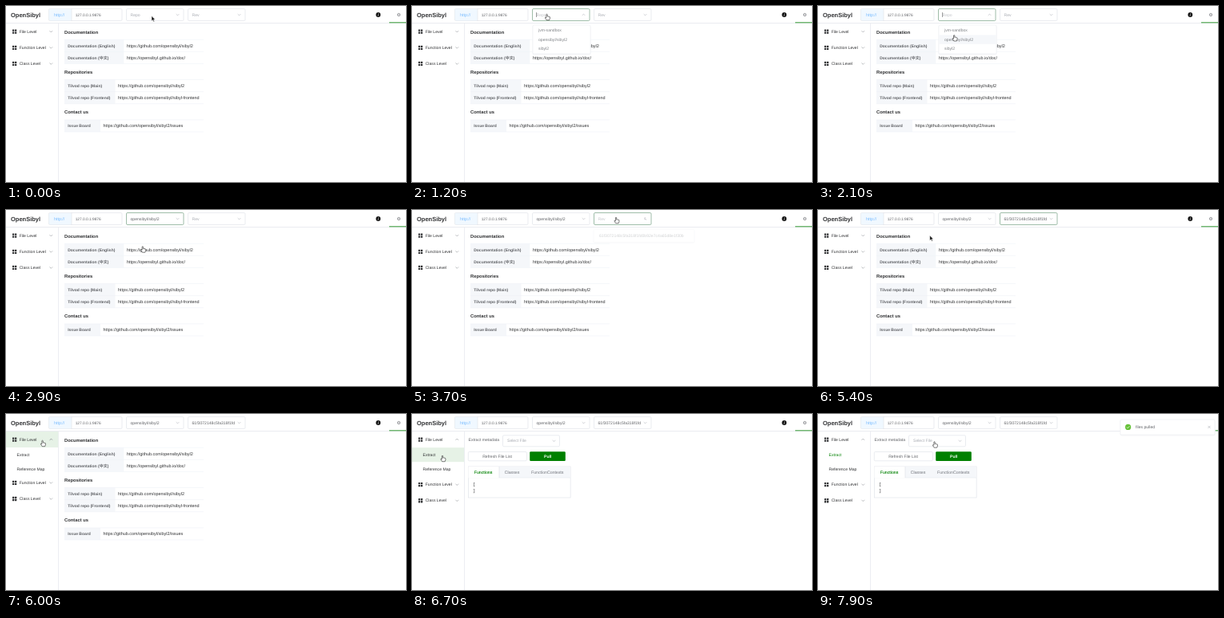
An HTML page for the animation above (8000 ms loop, 500 by 221 pixels).

```html
<!DOCTYPE html>
<html lang="en">
<head>
<meta charset="utf-8">
<title>OpenSibyl</title>
<style>
  html, body { margin: 0; height: 100%; overflow: hidden; background: #fff; }
  svg { display: block; width: 100vw; height: 100vh; }
  text { font-family: "Liberation Sans", Arial, "Noto Sans CJK SC", "Noto Sans CJK", sans-serif;
         text-rendering: geometricPrecision; white-space: pre; }
</style>
</head>
<body>
<svg id="stage" viewBox="0 0 500 221"></svg>
<script>
const LOOP = 8000, TICK = 100;
const GREEN = '#008000', FOCUS = '#5f9070', INK = '#303133', GRAY = '#606266', HINT = '#a8abb2',
      LINE = '#dcdfe6', PALE = '#f5f7fa', HOVER = '#e6f2e6';

// Cursor stops: time, x, y
const route = [
  [0, 183, 15.5], [400, 158, 14], [800, 169.5, 14], [1500, 169.5, 14], [2400, 171.7, 49.5],
  [2900, 171.7, 49.5], [3300, 228, 13], [3700, 256, 13], [4200, 256.5, 34], [4400, 256.5, 34],
  [5000, 235, 33], [5100, 235, 33], [5700, 46.5, 37], [6000, 46.5, 37], [6500, 39, 56],
  [7200, 39, 56], [7900, 146.5, 38.5], [8000, 146.5, 38.5]];

const ramp = (t, a, b) => Math.min(1, Math.max(0, (t - a) / (b - a)));
const easeOut = k => 1 - (1 - k) ** 2;

function cursorAt(t) {
  const i = route.findIndex(stop => stop[0] > t);
  const [t0, x0, y0] = route[i - 1], [t1, x1, y1] = route[i];
  const k = ramp(t, t0, t1), s = k * k * (3 - 2 * k);
  return [x0 + (x1 - x0) * s, y0 + (y1 - y0) * s];
}

// y is the middle of the line of text
const text = (x, y, str, { size = 5.1, fill = INK, more = '' } = {}) =>
  `<text x="${x}" y="${y + size * 0.35}" font-size="${size}" fill="${fill}" ${more}>${str}</text>`;
const bold = (x, y, str, size = 5, fill = INK) =>
  text(x, y, str, { size, fill, more: 'font-weight="700"' });
const rect = (x, y, w, h, fill, stroke = 'none', r = 0) =>
  `<rect x="${x}" y="${y}" width="${w}" height="${h}" rx="${r}" fill="${fill}" stroke="${stroke}" stroke-width=".6"/>`;
const line = (d, stroke, width = 0.6) =>
  `<path d="${d}" fill="none" stroke="${stroke}" stroke-width="${width}"/>`;
const group = (attrs, body) => `<g ${attrs}>${body}</g>`;
const chevron = (x, y, turn = 0, color = HINT) =>
  group(`transform="translate(${x} ${y}) rotate(${turn * 180})"`, line('M-1.8-.9L0 .9 1.8-.9', color, 0.55));

function select(x, y, label, { chosen, focus, open = 0 } = {}) {
  const fill = chosen ? GRAY : open ? '#c4c6ca' : HINT;
  return rect(x, y, 71.5, 15, '#fff', focus ? FOCUS : LINE, 1.4) +
    text(x + 5, y + 7.5, label, { fill }) + chevron(x + 64, y + 7.5, open);
}

function popup(x, y, w, h, opacity, body) {
  if (!opacity) return '';
  return group(`opacity="${opacity}"`,
    rect(x - 0.6, y + 0.4, w + 1.2, h + 1, '#f5f6f8', 'none', 1.8) +
    rect(x, y, w, h, '#fff', '#eceef2', 1.4) + body);
}

function header(t, repoOpen, revOpen) {
  const repoPicked = t >= 2500, revPicked = t >= 4400;
  const caret = t >= 1100 && t < 2500 && Math.floor((t - 1100) / 500) % 2 === 0;
  const teeth = Array.from({ length: 6 }, (_, i) =>
    group(`transform="rotate(${i * 60} 491 11)"`, line('M491 8.8V9.6', GRAY, 0.7))).join('');
  return bold(6, 11, 'OpenSibyl', 7.5) +
    rect(53.5, 3.5, 91.5, 15, '#fff', LINE, 1.4) +
    rect(53.8, 3.8, 28, 14.4, '#f0f8ff', 'none', 1.2) + line('M82 3.5V18.5', LINE) +
    text(60, 11, 'http://', { fill: '#74b9ff', size: 5.3 }) +
    text(86.7, 11, '127.0.0.1:9876', { fill: GRAY, size: 4.8 }) +
    select(150.5, 3.5, repoPicked ? 'opensibyl/sibyl2' : 'Repo',
      { chosen: repoPicked, focus: t >= 1100 && t < 3600, open: repoOpen }) +
    (caret ? line('M155.6 8V14', INK, 0.5) : '') +
    select(227.5, 3.5, revPicked ? '61f3072148c5fa318f1fd' : 'Rev',
      { chosen: revPicked, focus: t >= 3700 && t < 5800, open: revOpen }) +
    '<circle cx="465.3" cy="11" r="2.9" fill="#111"/>' + line('M465.5 10.4L465 12.8M465.6 9V9.7', '#fff', 0.6) +
    `<circle cx="491" cy="11" r="1.4" fill="none" stroke="${GRAY}" stroke-width=".5"/>` + teeth +
    line('M0 21.5H500', LINE) + line('M479 20.8H500', GREEN, 0.8);
}

function sidebar(t) {
  const unfold = easeOut(ramp(t, 5700, 6100)), shift = 36.3 * unfold;
  const entry = (y, label, turn = 0) =>
    [0, 3].map(dx => [0, 3].map(dy => rect(8 + dx, y - 2.6 + dy, 2.3, 2.3, INK, 'none', 0.3)).join('')).join('') +
    text(16.7, y, label) + chevron(56.3, y, turn, '#85888d');
  let out = line('M65.6 22V221', LINE);
  if (t >= 5600 && t < 6400) out += rect(0, 22, 65.3, 20, HOVER);
  out += entry(32, 'File Level', unfold) + entry(52.3 + shift, 'Function Level') + entry(72.4 + shift, 'Class Level');
  const hover = t >= 6400 && t < 7400;
  return out + `<clipPath id="fold"><rect y="42" width="65.3" height="${shift}"/></clipPath>` +
    group('clip-path="url(#fold)"',
      (hover ? rect(0, 42.2, 65.3, 18, HOVER) : '') +
      text(13.5, 51.3, 'Extract', { fill: t >= 6900 ? GREEN : INK }) + text(13.5, 69.5, 'Reference Map'));
}

function table(title, titleY, top, split, rows) {
  const bottom = top + rows.length * 15.1;
  return bold(73, titleY, title, 5.8) + rect(73, top, split - 73, bottom - top, PALE) +
    rows.map(([label, url], i) => {
      const y = top + 7.6 + i * 15.1;
      return bold(77.2, y, label, 5, GRAY) + text(split + 3.6, y, url, { size: 5.45 }) +
        line(`M73 ${y + 7.5}H247`, '#ebeef5', 0.5);
    }).join('') + line(`M73 ${top}H247`, '#ebeef5', 0.5);
}

const linksPage = () =>
  table('Documentation', 33, 42.2, 147.3, [
    ['Documentation (English)', 'https://github.com/opensibyl/sibyl2'],
    ['Documentation (中文)', 'https://opensibyl.github.io/doc/']]) +
  table('Repositories', 83.3, 92.5, 136.5, [
    ['Tilvod repo (Main)', 'https://github.com/opensibyl/sibyl2'],
    ['Tilvod repo (Frontend)', 'https://github.com/opensibyl/sibyl-frontend']]) +
  table('Contact us', 133.4, 142.9, 118, [
    ['Issue Board', 'https://github.com/opensibyl/sibyl2/issues']]);

function extractPage() {
  const tab = (x, label, fill) =>
    text(x, 73, label, { size: 5.2, fill, more: `stroke="${fill}" stroke-width=".12"` });
  const mono = (y, str) =>
    `<text x="76" y="${y}" font-size="5.4" fill="${INK}" style="font-family:'Liberation Mono',monospace">${str}</text>`;
  return text(70.5, 32.2, 'Extract metadata', { fill: GRAY }) +
    rect(113.5, 26.8, 71, 14, '#fff', LINE, 1.4) +
    text(119, 33.7, 'Select File', { fill: HINT }) + chevron(177.5, 33.7) +
    rect(70.3, 47.5, 73, 11.3, '#fff', LINE, 1.2) + text(88.2, 53.2, 'Refresh File List', { fill: GRAY }) +
    rect(147.2, 47.3, 44.6, 11.6, GREEN, 'none', 1.2) + bold(165, 53.2, 'Pull', 5.1, '#fff') +
    rect(70.3, 66, 127.8, 39, '#fff', LINE) + rect(70.6, 66.3, 127.2, 13.7, PALE) +
    line('M70.3 80H198', '#e4e7ed') + rect(70.6, 66.3, 38.4, 14.2, '#fff') + line('M109 66V80', LINE) +
    tab(77.8, 'Functions', GREEN) + tab(115.8, 'Classes', '#909399') + tab(149, 'FunctionContexts', '#909399') +
    mono(90.3, '[') + mono(97.6, ']');
}

function notice(t) {
  const k = easeOut(ramp(t, 6700, 7100));
  if (!k) return '';
  return group(`transform="translate(${122 * (1 - k)} 0)"`, popup(378, 7, 118, 19, k,
    '<circle cx="387.6" cy="16.4" r="3.6" fill="#67c23a"/>' + line('M385.8 16.5L387.1 17.8 389.5 15.2', '#fff', 0.7) +
    text(397, 16.4, 'files pulled', { fill: GRAY }) + line('M487.5 14.9L490.5 17.9M490.5 14.9L487.5 17.9', HINT, 0.6)));
}

function cursor(t) {
  const [x, y] = cursorAt(t);
  const arrow = t < 300 || (t >= 3000 && t < 3300) || (t >= 5200 && t < 5600);
  const shape = arrow
    ? '<path d="M-1-3V3.3L.5 2 1.5 4.2 2.5 3.7 1.6 1.6H3.4Z" fill="#111" stroke="#fff" stroke-width=".5"/>'
    : '<path d="M-1.6-3.4q.7-.8 1.3 0V-.9q.7-.5 1.1.1.7-.4 1.1.2.9-.3 1 .6V1.7L2.2 3.7H-1.3L-3.1.9q-.1-1 1-.5l.5.4Z" fill="#fff" stroke="#222" stroke-width=".6"/>';
  return group(`transform="translate(${x} ${y})"`, shape);
}

function scene(t) {
  const repoOpen = ramp(t, 1000, 1200) * (1 - ramp(t, 2400, 2700));
  const revOpen = ramp(t, 3600, 3900) * (1 - ramp(t, 4300, 4410));
  const item = (x, y, label) => text(x, y, label, { fill: '#7d8085' });
  return rect(0, 0, 500, 221, '#fff') + sidebar(t) +
    (t < 6600 ? linksPage() : extractPage()) + header(t, repoOpen, revOpen) +
    popup(151, 24, 72, 36, repoOpen,
      (t >= 2100 ? rect(151.3, 36.4, 71.4, 11.4, PALE) : '') +
      item(158, 30.3, 'jvm-sandbox') + item(158, 41.9, 'opensibyl/sibyl2') + item(158, 53.3, 'sibyl2')) +
    popup(227, 24.5, 126, 16, revOpen,
      (t >= 4000 ? rect(227.3, 27, 125.4, 11, PALE) : '') +
      item(234, 31.8, '61f3072148c5fa318f1fd0b92e7c4a65d8e1f30b')) +
    notice(t) + cursor(t);
}

const stage = document.getElementById('stage');
let shown = -1;
function draw() {
  const t = Math.floor(performance.now() % LOOP / TICK) * TICK;
  if (t !== shown) stage.innerHTML = scene(shown = t);
  requestAnimationFrame(draw);
}
draw();
</script>
</body>
</html>
```
